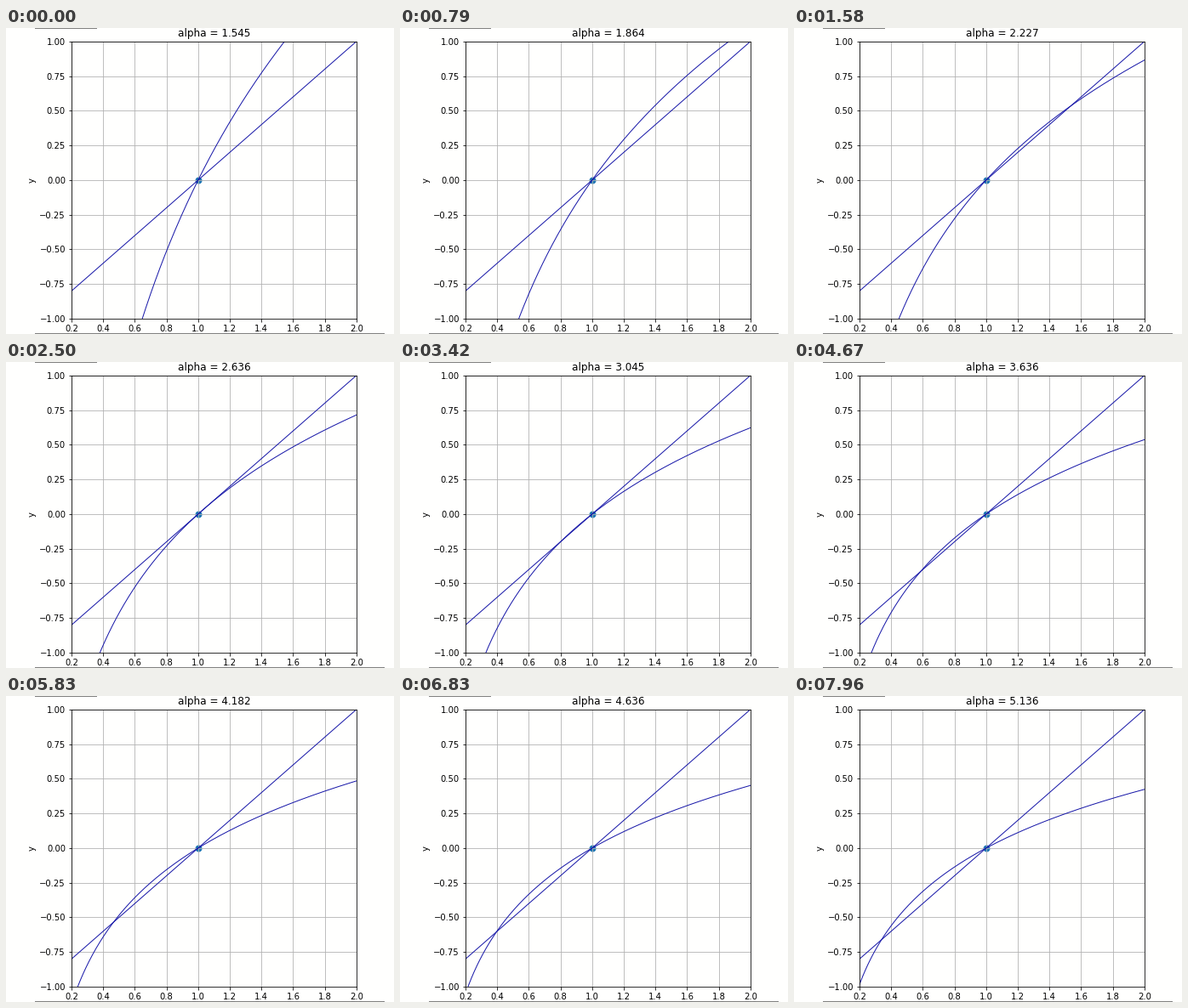
Animation, 456 px wide and 360 px high, one loop 8 s. Source, as a matplotlib script:

```python
import numpy as np
import matplotlib.pyplot as plt
from matplotlib.animation import FuncAnimation

W, H, DPI = 456, 360, 72
LEFT, BOTTOM = 77, 342        # axes corner in pixels, y from the top
AX_W, AX_H = 334.8, 326.16
INTERVAL = 25
FRAMES = 8000 // INTERVAL
HOLD = 4                      # frames each alpha stays on screen
PAPER, INK, RULE = "#fffffe", "#1717a8", "#808080"

plt.rcParams.update({"font.family": "DejaVu Sans", "font.size": 10})
fig = plt.figure(figsize=(W / DPI, H / DPI), dpi=DPI, facecolor=PAPER)
ax = fig.add_axes([LEFT / W, 1 - BOTTOM / H, AX_W / W, AX_H / H],
                  facecolor=PAPER)
ax.set_xlim(0.2, 2)
ax.set_ylim(-1, 1)
ax.set_xticks(np.linspace(0.2, 2, 10))
ax.set_yticks(np.linspace(-1, 1, 9))
ax.set_ylabel("y")
ax.grid(color="#b0b0b0", lw=0.8)

x = np.linspace(0.2, 2, 300)
ax.scatter([1], [0], s=49, color="#1f77b4")
ax.plot(x, x - 1, color=INK, lw=1)
curve, = ax.plot([], [], color=INK, lw=1)
title = ax.set_title("", fontsize=12, pad=6)


def edge_rule(x0, x1, y):
    """Thin horizontal rule in pixel coordinates, y counted from the top."""
    fig.add_artist(plt.Line2D([x0 / W, x1 / W], [1 - y / H] * 2,
                              color=RULE, lw=1))


edge_rule(34, 106, 0)
edge_rule(34, 444, 359)


def draw(i):
    step = max(0, (i - 1) // HOLD)
    alpha = (34 + step) / 22
    curve.set_data(x, np.log(x) / np.log(alpha))
    title.set_text(f"alpha = {alpha:.3f}")
    return curve, title


anim = FuncAnimation(fig, draw, frames=FRAMES, interval=INTERVAL,
                     init_func=lambda: draw(0), repeat=True, repeat_delay=0)
plt.show()
```
